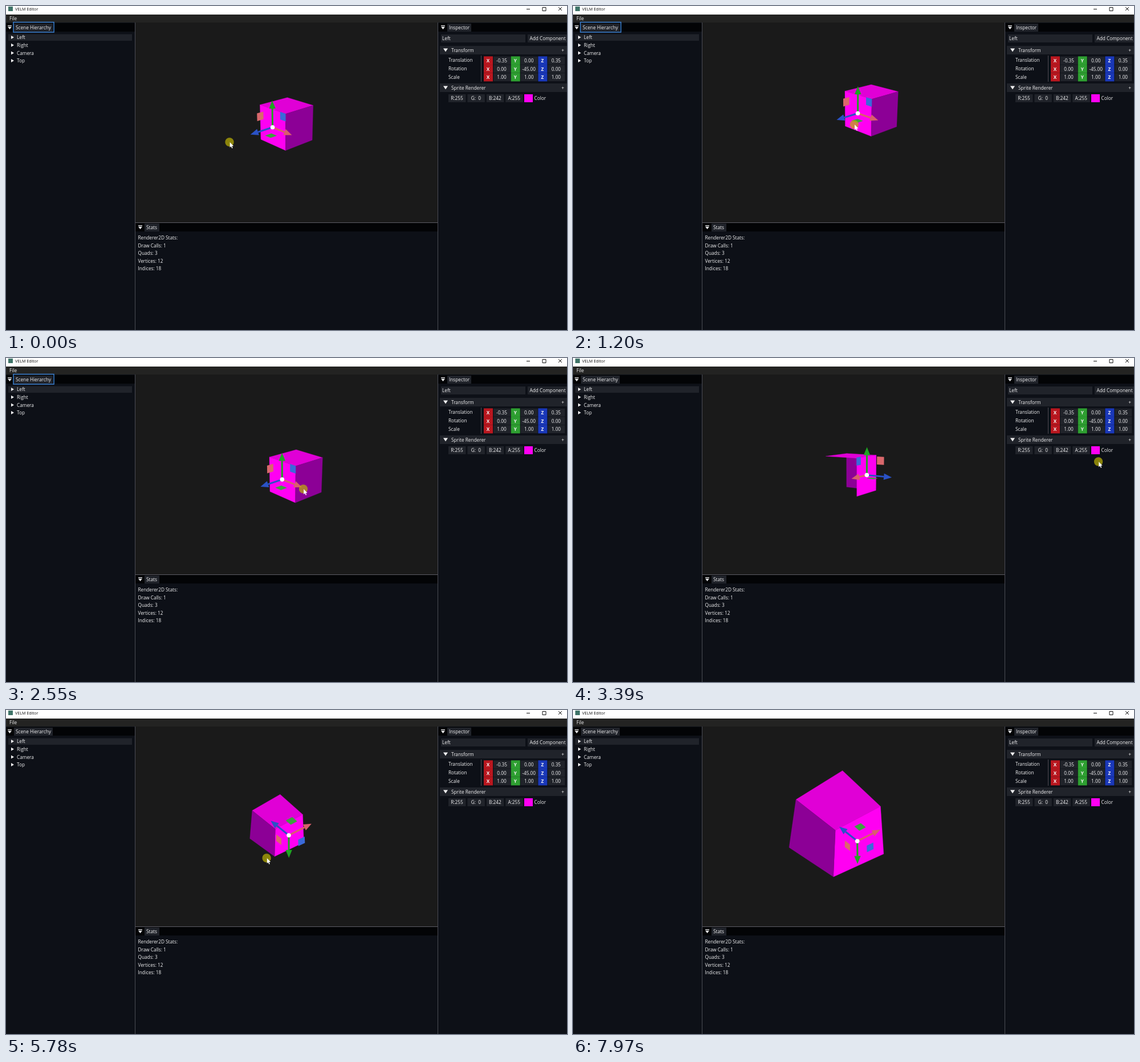
An HTML page with a canvas that plays this animation: 984 by 569 pixels, repeating every 8000 ms.

```html
<!DOCTYPE html>
<html lang="en">
<head>
<meta charset="utf-8">
<title>Scene editor</title>
<style>
  html, body { margin: 0; width: 100%; height: 100%; overflow: hidden; background: #0d1017; }
  svg, canvas { position: absolute; left: 0; top: 0; }
  text { font: 8.25px "Open Sans", sans-serif; fill: #f2f2f3; white-space: pre; }
  .title { font-size: 7.2px; fill: #111; }
  .axis { font-weight: 700; }
</style>
</head>
<body>
<svg id="ui" width="984" height="569" viewBox="0 0 984 569"></svg>
<canvas id="stage" width="984" height="569"></canvas>
<script>
const LOOP = 8000;
const ui = document.getElementById('ui');
const ctx = document.getElementById('stage').getContext('2d');

// ---------- Static interface ----------
const FIELD = '#20232a', TEXT = '#f2f2f3', EDGE = '#4b4c55';

function add(tag, attrs, content) {
  const el = document.createElementNS(ui.namespaceURI, tag);
  for (const key in attrs) el.setAttribute(key, attrs[key]);
  if (content !== undefined) el.textContent = content;
  return ui.appendChild(el);
}
const rect = (x, y, width, height, fill, more) => add('rect', { x, y, width, height, fill, ...more });
const path = (d, fill, stroke = 'none') => add('path', { d, fill, stroke });
const label = (x, middle, content, more) => add('text', { x, y: middle + 3, ...more }, content);
const centered = (x, middle, content, more) => label(x, middle, content, { 'text-anchor': 'middle', ...more });
const arrowRight = (x, y) => path(`M${x} ${y - 3}l5 3l-5 3z`, TEXT);
const arrowDown = (x, y) => path(`M${x} ${y - 3}h8l-4 6z`, TEXT);

function tabBar(x, y, width, tabWidth, name) {
  rect(x, y, width, 15, '#030406');
  rect(x + 5, y + 4, 7, 1.2, TEXT);
  path(`M${x + 5} ${y + 6.5}h7l-3.5 4.5z`, TEXT);
  rect(x + 16, y + 1, tabWidth, 14, FIELD);
  label(x + 19, y + 7.5, name);
}

function sectionHeader(middle, name) {
  rect(761, middle - 7.5, 223, 15, FIELD);
  arrowDown(767, middle);
  label(781, middle, name);
  centered(976.5, middle, '+');
}

rect(0, 0, 984, 15, '#fff');
rect(4, 1, 8, 8, '#3f7468');
label(16, 5.2, 'VELM Editor', { class: 'title' });
path('M913 5.5h6M941 2.5h6v6h-6zM969 2l6 6M975 2l-6 6', 'none', '#111');
rect(0, 15, 984, 14, '#232322');
label(6, 22.3, 'File');

rect(227, 29, 530, 351, '#1a1a1a');
rect(226, 29, 1, 540, EDGE);
rect(757, 29, 1, 540, EDGE);
rect(227, 380, 530, 1, '#5c5c64');

tabBar(-2, 30, 228, 68, 'Scene Hierarchy');
const focusRing = rect(13, 28.5, 71, 17.5, 'none', { stroke: '#3d82d4', 'stroke-width': 1.5 });
tabBar(758, 30, 226, 42, 'Inspector');
tabBar(227, 381, 530, 26, 'Stats');

rect(4, 49.5, 217, 11.5, FIELD);
['Left', 'Right', 'Camera', 'Top'].forEach((name, i) => {
  arrowRight(9, 55 + i * 13.7);
  label(19, 55.3 + i * 13.7, name);
});
['Renderer2D Stats:', 'Draw Calls: 1', 'Quads: 3', 'Vertices: 12', 'Indices: 18']
  .forEach((line, i) => label(231.5, 407 + i * 13.6, line));

rect(763, 50, 148, 14, FIELD);
label(765, 57, 'Left');
rect(915, 50, 69, 14, FIELD);
label(918.5, 57, 'Add Component');

sectionHeader(77.5, 'Transform');
rect(833, 87, 1, 46, EDGE);
['Translation', 'Rotation', 'Scale'].forEach((name, row) => {
  const middle = 95.7 + row * 14.7;
  label(776, 94.5 + row * 15.4, name);
  ['#b9171f', '#2e9f31', '#1a38b9'].forEach((color, i) => {
    const x = 838 + i * 47.7;
    const value = row === 2 ? 1 : [-.35, 0, .35, 0, -45, 0][row * 3 + i];
    rect(x, middle - 7.3, 16, 14.6, color);
    centered(x + 7.6, middle + .3, 'XYZ'[i], { class: 'axis' });
    rect(x + 17, middle - 7, 30, 14, FIELD);
    centered(x + 31.5, middle + .3, value.toFixed(2));
  });
});

sectionHeader(143.5, 'Sprite Renderer');
['R:255', 'G:  0', 'B:242', 'A:255'].forEach((value, i) => {
  rect(776 + i * 33.4, 155, 30.5, 14, FIELD);
  centered(791 + i * 33.4, 162, value);
});
rect(909, 155, 15, 14, '#ff00f2');
label(926.5, 162, 'Color');

// ---------- Motion ----------
// Turning points of the mouse: time in ms, x, y. The camera follows from its drags.
const MOUSE = [
  [0, 392, 239], [150, 438, 242.5], [380, 380, 290], [520, 425, 333], [790, 492, 299],
  [1030, 530, 250], [1250, 480, 204], [1680, 374, 253], [2250, 467, 243], [2600, 534, 227.5],
  [3390, 921, 182], [3450, 957, 190], [3800, 437, 240], [4120, 717, 226], [4500, 520, 301],
  [5030, 520, 123], [5300, 391, 200], [5780, 457, 260], [6650, 558, 211], [6800, 558, 211],
  [7480, 6, 277], [7930, 15, 580]
];
const clamp = (value, low, high) => Math.min(Math.max(value, low), high);

// Smooth interpolation that never overshoots a turning point.
function mouseAt(t) {
  let i = 0;
  while (i < MOUSE.length - 2 && t >= MOUSE[i + 1][0]) i++;
  const span = MOUSE[i + 1][0] - MOUSE[i][0];
  const s = clamp((t - MOUSE[i][0]) / span, 0, 1);
  const slope = (k, c) => MOUSE[k] && MOUSE[k + 1]
    ? (MOUSE[k + 1][c] - MOUSE[k][c]) / (MOUSE[k + 1][0] - MOUSE[k][0]) : 0;
  const tangent = (k, c) => {
    const before = slope(k - 1, c), after = slope(k, c);
    return before * after > 0 ? 2 * before * after / (before + after) : 0;
  };
  return [1, 2].map(c => MOUSE[i][c] + slope(i, c) * span * s * s * (3 - 2 * s)
    + span * s * (1 - s) * (tangent(i, c) * (1 - s) - tangent(i + 1, c) * s));
}

// How far the mouse has been dragged, summed over [press, release] times.
function dragged(t, ...drags) {
  return drags.reduce(([dx, dy], [press, release]) => {
    const [x0, y0] = mouseAt(press), [x1, y1] = mouseAt(clamp(t, press, release));
    return [dx + x1 - x0, dy + y1 - y0];
  }, [0, 0]);
}

// ---------- Scene ----------
const FOCAL = 655, CENTER_X = 492, CENTER_Y = 205;
const FOCUS_LOST = 2600;
const rad = degrees => degrees * Math.PI / 180;

// World points are [angle around the vertical axis, radius, height].
function makeCamera(t) {
  const [panX, panY] = dragged(t, [150, 2250]);
  const [orbitX, orbitY] = dragged(t, [FOCUS_LOST, 3450], [3800, 4120], [4500, 5030]);
  const [, zoom] = dragged(t, [5780, 6650], [7480, 7930]);

  const distance = 10.1 * Math.exp(-.0021 * zoom);
  const turn = rad(.268 * orbitX), yaw = turn - rad(1.9);
  const pitch = rad(20.5 + .268 * orbitY);
  const sin = Math.sin(pitch), cos = Math.cos(pitch);
  const side = panX * .00864, drop = panY * .01064;

  const turned = (angle, radius, y) => {
    const a = yaw + rad(angle), near = radius * Math.cos(a);
    return [radius * Math.sin(a), y * cos - near * sin, near * cos + y * sin];
  };
  const shift = [side * Math.cos(turn), side * Math.sin(turn) * sin - drop, -side * Math.sin(turn) * cos];
  return {
    distance,
    direction: turned,
    point: (...world) => turned(...world).map((n, i) => n + shift[i]),
    project([x, up, toward]) {
      const scale = FOCAL / (distance - toward);
      return [CENTER_X + x * scale, CENTER_Y - up * scale];
    }
  };
}

function polygon(points, color) {
  ctx.beginPath();
  points.forEach(p => ctx.lineTo(...p));
  ctx.closePath();
  ctx.fillStyle = color;
  ctx.fill();
}

const wall = (a, b) => [[a, .5], [b, .5], [b, -.5], [a, -.5]];
const FACES = [
  [wall(-90, 0), '#ff00f2'],
  [wall(0, 90), '#8c0096'],
  [[-90, 0, 90, 180].map(a => [a, .5]), '#e000d6']
];

function drawCube(camera) {
  FACES.map(([corners, color]) => {
    const points = corners.map(([a, y]) => camera.point(a, Math.SQRT1_2, y));
    return { color, points, depth: points.reduce((sum, p) => sum + p[2], 0) };
  }).sort((a, b) => a.depth - b.depth).forEach(({ points, color }) => {
    polygon(points.map(camera.project), color);
    // A hairline closes the seams between faces.
    ctx.strokeStyle = color;
    ctx.lineWidth = .3;
    ctx.stroke();
  });
}

function drawArrow([x0, y0], [x1, y1], color) {
  const length = Math.hypot(x1 - x0, y1 - y0) || 1;
  const ux = (x1 - x0) / length, uy = (y1 - y0) / length;
  const bx = x1 - ux * 14, by = y1 - uy * 14;
  ctx.strokeStyle = color;
  ctx.lineWidth = 3;
  ctx.beginPath();
  ctx.moveTo(x0, y0);
  ctx.lineTo(bx, by);
  ctx.stroke();
  polygon([[x1, y1], [bx - uy * 5.7, by + ux * 5.7], [bx + uy * 5.7, by - ux * 5.7]], color);
}

function disc(x, y, radius, color) {
  ctx.fillStyle = color;
  ctx.beginPath();
  ctx.arc(x, y, radius, 0, 2 * Math.PI);
  ctx.fill();
}

function drawGizmo(camera) {
  const origin = camera.point(-45, .5, 0);
  const size = 49 / FOCAL * (camera.distance - origin[2]);
  // Every axis turns toward the viewer and keeps its size on screen.
  const [x, y, z] = [[45, 1, 0], [0, 0, 1], [-45, 1, 0]].map(axis => {
    const v = camera.direction(...axis);
    return v.map(n => n * (v[2] < 0 ? -size : size));
  });
  const at = (u, a, v = 0, b = x) => camera.project(origin.map((n, i) => n + u * a[i] + v * b[i]));
  const center = camera.project(origin);
  const plane = (a, b, color) =>
    polygon([[.41, .41], [.69, .41], [.69, .69], [.41, .69]].map(([u, v]) => at(u, a, v, b)), color);

  drawArrow(center, at(1, x), '#d95f6c');
  plane(y, z, '#d9686c');
  drawArrow(center, at(1, y), '#1fa522');
  plane(x, z, '#3f9f40');
  drawArrow(center, at(1, z), '#2a52c6');
  plane(x, y, '#3a6ad9');
  disc(...center, 3.8, '#fff');
}

function drawCursor(x, y) {
  disc(x, y, 7.7, 'rgba(190,180,5,.7)');
  const shape = [[0, 0], [0, 9.3], [2.1, 7.4], [3.6, 10.7], [5, 10], [3.6, 6.9], [6.4, 6.7]];
  polygon(shape.map(([dx, dy]) => [x + .7 + dx, y + .2 + dy]), '#fff');
}

function draw(now) {
  const t = now % LOOP, camera = makeCamera(t);
  focusRing.style.display = t < FOCUS_LOST ? '' : 'none';
  ctx.clearRect(0, 0, 984, 569);
  drawCube(camera);
  drawGizmo(camera);
  drawCursor(...mouseAt(t));
}

const start = performance.now();
function tick() {
  draw(performance.now() - start);
  requestAnimationFrame(tick);
}
tick();
</script>
</body>
</html>
```
